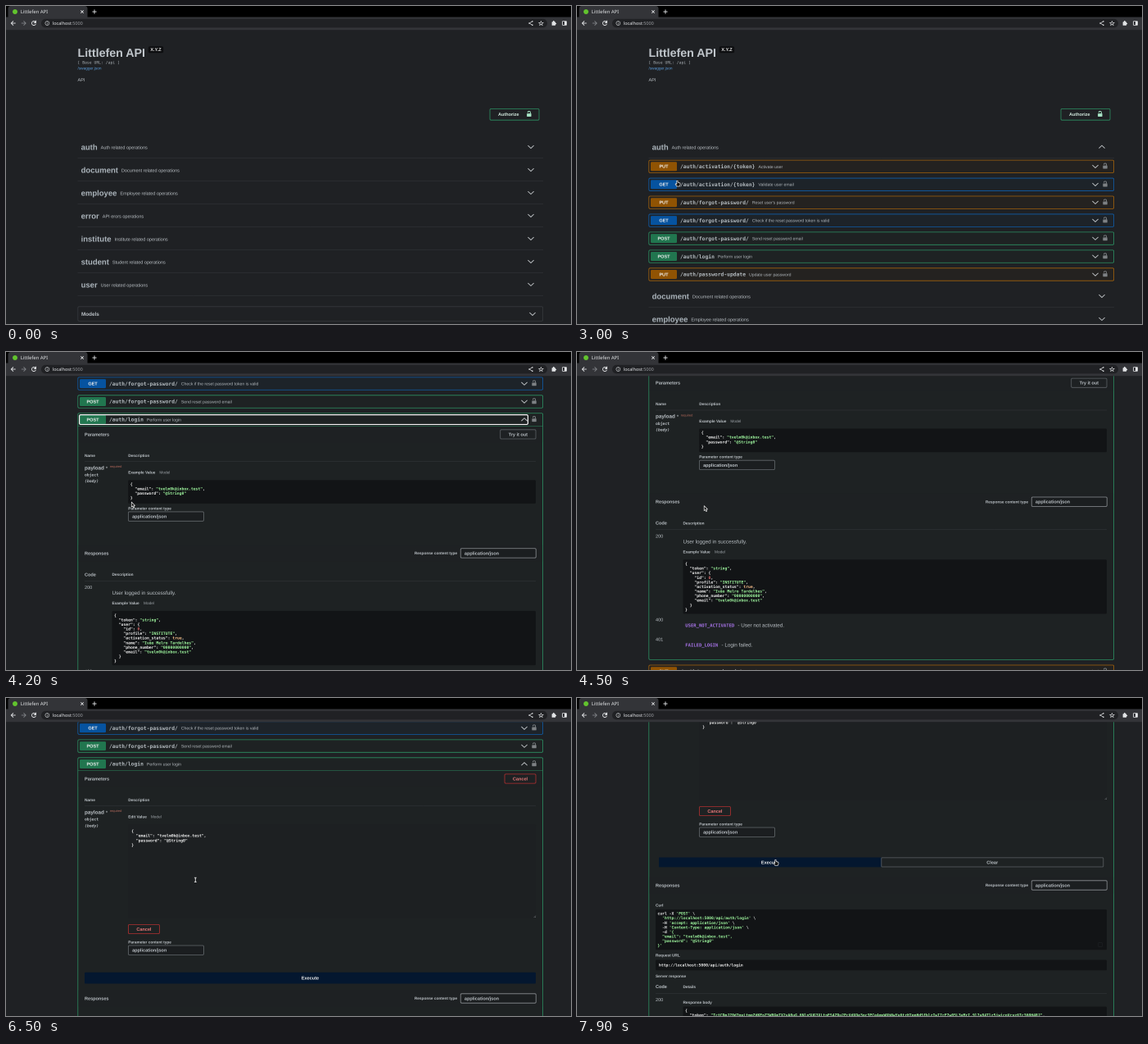
Animation of 690x388 px, one loop 8000 ms. Source, as an HTML page with a canvas:

```html
<!DOCTYPE html>
<html lang="en">
<head>
<meta charset="utf-8">
<title>API docs</title>
<style>
html, body { margin: 0; width: 100%; height: 100%; overflow: hidden; background: #1f2124; }
canvas { display: block; width: 690px; height: 388px; }
</style>
</head>
<body>
<canvas id="stage"></canvas>
<script>
const W = 690, H = 388, TOP = 29.2, LOOP = 8000, STEP = 100;
const canvas = document.getElementById('stage');
// Twice the screen density keeps the tiny type smooth.
const density = 2 * (window.devicePixelRatio || 1);
canvas.width = W * density;
canvas.height = H * density;
const ctx = canvas.getContext('2d');
ctx.textRendering = 'geometricPrecision';

const SANS = '"Liberation Sans", Arial, sans-serif';
const MONO = '"DejaVu Sans Mono", monospace';
const UI = '"Noto Sans", sans-serif';
const S12 = 4.74, S13 = 5.14, S14 = 5.53, S16 = 6.33;
const CH = S12 * 0.602, LEAD = 5.58;

const BG = '#1f2124', TEXT = '#bcc2c7', HEAD = '#abb4bb', LINE = '#36393d';
const WHITE = '#f1f1f1', GREEN = '#a2fca2', CODE_BG = '#121416';
const METHODS = {
  PUT: { fill: '#905303', edge: '#a1610d', tint: '#242220' },
  GET: { fill: '#0653a0', edge: '#0f5ca8', tint: '#1d2329' },
  POST: { fill: '#21764f', edge: '#2c8f62', tint: '#1e2223' }
};

const NAME = 'Littlefen API';
const MAIL = 'tvelm0k@inbox.test';
const TAGS = [
  ['auth', 'Auth related operations'],
  ['document', 'Document related operations'],
  ['employee', 'Employee related operations'],
  ['error', 'API erors operations'],
  ['institute', 'Institute related operations'],
  ['student', 'Student related operations'],
  ['user', 'User related operations']
];
const OPS = [
  ['PUT', '/auth/activation/{token}', 'Activate user'],
  ['GET', '/auth/activation/{token}', 'Validate user email'],
  ['PUT', '/auth/forgot-password/', "Reset user's password"],
  ['GET', '/auth/forgot-password/', 'Check if the reset password token is valid'],
  ['POST', '/auth/forgot-password/', 'Send reset password email'],
  ['POST', '/auth/login', 'Perform user login'],
  ['PUT', '/auth/password-update', 'Update user password']
];
const PAYLOAD = ['{', `  "email": "${MAIL}",`, '  "password": "@String0"', '}'];
const REPLY = [
  '{', '  "token": "string",', '  "user": {', '    "id": 0,', '    "profile": "INSTITUTE",',
  '    "activation_status": true,', '    "name": "Ivão Melro Tardelhes",',
  '    "phone_number": "00000000000",', `    "email": "${MAIL}"`, '  }', '}'
];
const CURL = [
  "curl -X 'POST' \\", "  'http://localhost:5000/api/auth/login' \\",
  "  -H 'accept: application/json' \\", "  -H 'Content-Type: application/json' \\",
  "  -d '{", `  "email": "${MAIL}",`, '  "password": "@String0"', "}'"
];

function makeToken(n) {
  const set = 'ABCDEFGHIJKLMNOPQRSTUVWXYZabcdefghijklmnopqrstuvwxyz0123456789';
  let seed = 41, out = '';
  while (out.length < n) {
    seed = (seed * 16807) % 2147483647;
    out += out.length === 36 || out.length === 110 ? '.' : set[seed % 62];
  }
  return out;
}
const BODY = ['{', `  "token": "${makeToken(140)}",`];

// Text is centred vertically on y; set large and scaled down for exact advances.
function text(s, x, y, size, color, o = {}) {
  ctx.save();
  ctx.translate(x, y + size * 0.35);
  ctx.scale(0.1, 0.1);
  ctx.font = `${o.italic ? 'italic ' : ''}${o.bold ? 'bold ' : ''}${size * 10}px ${o.font || SANS}`;
  ctx.textAlign = o.align || 'left';
  ctx.fillStyle = color;
  ctx.fillText(s, 0, 0);
  const w = ctx.measureText(s).width / 10;
  ctx.restore();
  return w;
}
const bold = (s, x, y, size = S14, color = TEXT, align) => text(s, x, y, size, color, { bold: true, align });
const mono = (s, x, y, size, color, o) => text(s, x, y, size, color, { bold: true, font: MONO, ...o });

function box(x, y, x2, y2, r, fill, edge, lw = 0.8) {
  ctx.beginPath();
  ctx.roundRect(x, y, x2 - x, y2 - y, r);
  if (fill) { ctx.fillStyle = fill; ctx.fill(); }
  if (edge) { ctx.strokeStyle = edge; ctx.lineWidth = lw; ctx.stroke(); }
}
function path(pts, color, lw, fill) {
  ctx.beginPath();
  for (let i = 0; i < pts.length; i += 2) ctx.lineTo(pts[i], pts[i + 1]);
  if (fill) { ctx.closePath(); ctx.fillStyle = fill; ctx.fill(); }
  ctx.strokeStyle = color;
  ctx.lineWidth = lw;
  ctx.stroke();
}
function arc(x, y, r, a, b, color, lw) {
  ctx.beginPath();
  ctx.arc(x, y, r, a, b);
  ctx.strokeStyle = color;
  ctx.lineWidth = lw;
  ctx.stroke();
}
const rule = (x, x2, y, color = LINE) => path([x, y, x2, y], color, 0.5);

function chevron(x, y, up) {
  const d = up ? -1.7 : 1.7;
  path([x - 3.6, y - d, x, y + d, x + 3.6, y - d], '#c4c8cb', 0.9);
}
function lock(x, y, color) {
  box(x - 2.7, y - 0.5, x + 2.7, y + 3.4, 0.5, color);
  arc(x, y - 1.5, 1.6, Math.PI, Math.PI * 2, color, 0.9);
  path([x + 1.6, y - 1.6, x + 1.6, y], color, 0.9);
}
function button(s, x, y, x2, y2, edge, color) {
  box(x, y, x2, y2, 1.3, null, edge);
  bold(s, (x + x2) / 2, (y + y2) / 2, S14, color, 'center');
}
function select(x, y, edge) {
  box(x, y - 5.7, x + 92, y + 5.7, 1.3, '#1b1e20', edge);
  bold('application/json', x + 4.7, y, S14);
}

const JSON_RE = /"[^"]*"(?=:)|"[^"]*"|\b(?:true|\d+)\b/g;
const CURL_RE = /'[^']*'?|^ +".*|^}'/g;
function tint(tok, line, at) {
  if (tok[0] === '"' && line[at + tok.length] === ':') return WHITE;
  if (tok === 'true') return '#fcc28c';
  return /^\d/.test(tok) ? '#d36363' : GREEN;
}
function code(lines, x, y, re) {
  lines.forEach((line, i) => {
    const put = (s, at, color) => s.trim() && mono(s, x + at * CH, y + i * LEAD, S12, color);
    let pos = 0;
    if (re) for (const m of line.matchAll(re)) {
      put(line.slice(pos, m.index), pos, WHITE);
      put(m[0], m.index, re === CURL_RE ? GREEN : tint(m[0], line, m.index));
      pos = m.index + m[0].length;
    }
    put(line.slice(pos), pos, WHITE);
  });
}

function tabsAndToolbar() {
  ctx.fillStyle = '#000';
  ctx.fillRect(0, 0, W, 14);
  box(2.5, 0, 99.5, 18, 3, '#333438');
  ctx.fillStyle = '#333438';
  ctx.fillRect(0, 13.5, W, TOP - 13.5);
  ctx.beginPath();
  ctx.arc(11, 7, 3, 0, 7);
  ctx.fillStyle = '#62c32e';
  ctx.fill();
  text(NAME, 17.8, 6.8, 5.85, '#e4e6e8', { font: UI });
  const c = '#e2e4e6';
  path([91.3, 5.3, 94.7, 8.7], c, 0.8);
  path([94.7, 5.3, 91.3, 8.7], c, 0.8);
  path([105.4, 7, 110.6, 7], c, 0.9);
  path([108, 4.4, 108, 9.6], c, 0.9);
  const arrow = (x, d, color) => {
    path([x - 2.7 * d, 21, x + 2.7 * d, 21], color, 0.9);
    path([x, 18.3, x - 2.7 * d, 21, x, 23.7], color, 0.9);
  };
  arrow(9, 1, c);
  arrow(21.5, -1, '#7f8286');
  arc(34, 21, 2.5, 0.3, 5.4, c, 0.9);
  path([36.6, 18.2, 36.6, 20.5, 34.3, 20.5], c, 0.8, c);
  box(43, 15.8, 661, 26.4, 5.3, '#202124');
  arc(50.3, 21, 2.4, 0, 7, '#c4c7ca', 0.7);
  path([50.3, 20.6, 50.3, 22.4], '#c4c7ca', 0.7);
  path([50.3, 19.4, 50.3, 20], '#c4c7ca', 0.7);
  const w = text('localhost', 56.8, 21, 5.45, '#e8eaed', { font: UI });
  text(':5000', 56.8 + w, 21, 5.45, '#9a9da1', { font: UI });
  path([642.8, 18.8, 639, 21, 642.8, 23.2], c, 0.7);
  for (const [x, y] of [[642.8, 18.8], [639, 21], [642.8, 23.2]]) box(x - 0.8, y - 0.8, x + 0.8, y + 0.8, 0.8, c);
  const star = [];
  for (let i = 0; i <= 10; i++) {
    const a = i * Math.PI / 5 - Math.PI / 2, r = i % 2 ? 1.2 : 2.9;
    star.push(653.4 + r * Math.cos(a), 21.2 + r * Math.sin(a));
  }
  path(star, c, 0.6);
  box(666.6, 19.3, 671, 23.8, 0.6, c);
  box(667.9, 17.9, 669.7, 20, 0.9, c);
  box(670, 20.6, 672.2, 22.4, 0.9, c);
  box(679.5, 18.6, 684.5, 23.4, 0.5, null, c, 0.8);
  box(682, 18.6, 684.5, 23.4, 0.3, c);
}

function info() {
  bold(NAME, 87.5, 57.2, 14.23, '#c0c6cb');
  box(173.8, 49.2, 192.2, 57.2, 2, '#0d0e10');
  bold('X.Y.Z', 183, 53.2, S14, '#e6e6e6', 'center');
  mono('[ Base URL: /api ]', 87.5, 68.8, S12, '#a9b0b5', { bold: false });
  text('/swagger.json', 87.5, 75.6, S12, '#5b9bd8');
  text('API', 87.5, 90, S14, TEXT);
  button('', 591, 125.5, 651, 139.2, '#2c8f62');
  bold('Authorize', 601, 132.3, S14, '#d3eadf');
  lock(638.8, 131.6, '#a6e3c5');
}
function tagRow(y, [name, desc], open) {
  const w = bold(name, 91.6, y, 9.49, HEAD);
  text(desc, 91.6 + w + 4, y + 0.3, S14, TEXT);
  chevron(641, y - 0.3, open);
  rule(87.5, 656, y + 13.4);
}
function opRow(y, [method, route, desc], open) {
  const m = METHODS[method];
  if (!open) box(87.8, y - 7.7, 655.6, y + 7.7, 1.6, m.tint, m.edge);
  box(90, y - 5.5, 122, y + 5.5, 1.2, m.fill);
  bold(method, 106, y, S14, '#f2f2f2', 'center');
  const w = mono(route, 126, y, S16, '#b3babf');
  text(desc, 126 + w + 4, y + 0.2, S13, '#b3b9be');
  chevron(633, y, open);
  lock(645, y - 0.7, '#7d8184');
}

function replies(d) {
  ctx.save();
  ctx.translate(0, d);
  bold('Code', 96, 269.5);
  bold('Description', 129.5, 269.5, S12);
  rule(96, 647, 277.5);
  text('200', 96, 285.3, S14, TEXT);
  text('User logged in successfully.', 129.5, 292, S16, TEXT);
  bold('Example Value', 129.5, 304.6, S12);
  text('Model', 168, 304.6, S12, '#9da3a8');
  box(129.5, 314, 647, 380.3, 1.6, CODE_BG);
  code(REPLY, 132, 319.2, JSON_RE);
  [['400', 387.5, 'USER_NOT_ACTIVATED', '- User not activated.'],
   ['401', 411.6, 'FAILED_LOGIN', '- Login failed.']].forEach(([n, y, key, msg]) => {
    text(n, 96, y, S14, TEXT);
    const w = mono(key, 132.3, y + 7, S14, '#a673e6');
    text(msg, 132.3 + w + 4.2, y + 6.7, S16, TEXT);
  });
  ctx.restore();
}
function liveReply(r) {
  ctx.save();
  ctx.translate(0, r - 228.5);
  bold('Curl', 96, 253, S12);
  box(96, 258, 647, 307.3, 1.6, CODE_BG);
  code(CURL, 98.4, 263, CURL_RE);
  box(636.8, 298.6, 641.4, 303.4, 0.5, null, '#202326', 0.6);
  bold('Request URL', 96, 314, S12);
  box(96, 319.5, 647, 332.3, 1.6, CODE_BG);
  mono('http://localhost:5000/api/auth/login', 100, 326, S12, WHITE);
  bold('Server response', 96, 339.5, S12);
  bold('Code', 96, 352.2);
  bold('Details', 129.5, 352.2, S12);
  rule(96, 647, 360.3);
  text('200', 96, 368, S14, TEXT);
  bold('Response body', 129.5, 371.5, S12);
  box(129.5, 376.5, 647, 450, 1.6, CODE_BG);
  code(BODY, 132, 381.2, JSON_RE);
  ctx.restore();
}
const replyShift = s => !s.edit ? 0 : s.exec ? 129 : 123;
const loginExtra = s => 348 + replyShift(s) + (s.done ? 220 : 0);

// Expanded login operation; its summary row is centred on y = 80.5.
function loginBlock(s) {
  const m = METHODS.POST, r = 243.5 + replyShift(s), band = 'rgba(31,33,35,.6)';
  box(87.8, 72.8, 655.6, 88.2 + loginExtra(s), 1.6, m.tint, m.edge);
  opRow(80.5, OPS[5], true);
  rule(88, 655.4, 88.4, m.edge);
  if (!s.edit) box(89.6, 74.7, 637.4, 86.5, 1.6, null, '#f4f4f4', 1.2);
  ctx.fillStyle = band;
  ctx.fillRect(88.3, 88.8, 566.8, 19.6);
  ctx.fillRect(88.3, r - 10, 566.8, 20);
  bold('Parameters', 96, 98.5);
  if (s.edit) button('Cancel', 609, 92.9, 647, 104.1, '#b03030', '#ea7a7a');
  else button('Try it out', 603.7, 92.9, 647, 104.1, '#5c6165', TEXT);
  bold('Name', 96, 124.2, S12);
  bold('Description', 149.2, 124.2, S12);
  rule(96, 647, 131.8);
  bold('payload', 96, 139.3, S16);
  text('*', 121.8, 139.8, S16, TEXT);
  text('required', 126.8, 137.8, 3.95, '#b56a5c');
  mono('object', 96, 148, S12, TEXT);
  mono('(body)', 96, 155.6, S12, TEXT, { italic: true });
  const w = bold(s.edit ? 'Edit Value' : 'Example Value', 149.2, 145, S12);
  text('Model', 149.2 + w + 5, 145, S12, '#9da3a8');
  if (s.edit) {
    box(149.2, 154.3, 647, 269, 1.4, '#1d2022');
    code(PAYLOAD, 153.2, 162.5);
    path([644.6, 268, 647, 265.6], '#8b8f92', 0.5);
    path([646, 268, 647, 267], '#8b8f92', 0.5);
    button('Cancel', 149.4, 276.5, 187.4, 287.5, '#b03030', '#ea7a7a');
  } else {
    box(149.2, 154.3, 647, 183, 1.6, CODE_BG);
    code(PAYLOAD, 151.7, 159.3, JSON_RE);
  }
  const p = s.edit ? 109 : 0;
  bold('Parameter content type', 149.2, 188.8 + p, S12);
  select(149.4, 198.7 + p, '#63686c');
  if (s.exec) {
    box(100, 338.5, 371.5, 350.4, 0, '#04172f');
    box(371.8, 338.9, 642.8, 350, 0.8, null, '#5c6165');
    bold('Execute', 235.5, 344.4, S14, WHITE, 'center');
    bold('Clear', 507.2, 344.4, S14, TEXT, 'center');
  } else if (s.edit) {
    box(96, 334.8, 647, 348.5, 1.3, '#04172f');
    bold('Execute', 371.5, 341.6, S14, WHITE, 'center');
  }
  bold('Responses', 96, r);
  bold('Response content type', 551, r, S12, TEXT, 'right');
  select(555.2, r, '#8b8f93');
  if (s.done) liveReply(r);
  else replies(r - 243.5);
}

function page(s, scroll) {
  ctx.save();
  ctx.beginPath();
  ctx.rect(0, TOP, W, H);
  ctx.clip();
  ctx.translate(0, -scroll);
  info();
  let y = 172.2;
  TAGS.forEach((tag, i) => {
    const open = s.auth && i === 0;
    tagRow(y, tag, open);
    if (open) {
      OPS.forEach((op, k) => {
        const oy = 195.8 + k * 21.95;
        if (k === 5 && s.login) {
          ctx.save();
          ctx.translate(0, 225);
          loginBlock(s);
          ctx.restore();
        } else opRow(oy + (k > 5 && s.login ? loginExtra(s) : 0), op);
      });
      y += 154 + (s.login ? loginExtra(s) : 0);
    }
    y += 27.97;
  });
  box(87.8, y - 1.2, 655.6, y + 16.4, 1.6, null, LINE);
  bold('Models', 92, y + 7.8, S16);
  chevron(643, y + 7.8);
  ctx.restore();
}

const SCROLL = [[0, 0], [3000, 0], [3400, 129], [3900, 129], [4400, 285.8], [4800, 285.8],
  [5200, 225], [6600, 225], [7100, 369], [8000, 369]];
const POINTER = [[1400, 470, 263], [1600, 399, 252], [1700, 399, 252], [2600, 149, 178], [2800, 124, 174],
  [3000, 122.5, 213], [3400, 131.5, 223], [3600, 132, 222], [3800, 150, 176], [4000, 152, 180],
  [4500, 155.2, 187.6], [4900, 158, 190], [5500, 544.2, 162.8], [5800, 624, 98], [5900, 624, 98],
  [6500, 231.3, 221.8], [6700, 231.3, 221.8], [7200, 242.5, 197.3], [8000, 242.5, 197.3]];
const SHAPES = [[1400, 'hand'], [4000, 'arrow'], [5700, 'hand'], [6000, 'arrow'], [6200, 'beam'], [7100, 'hand']];

function at(keys, t) {
  let i = 0;
  while (i < keys.length - 2 && t >= keys[i + 1][0]) i++;
  const a = keys[i], b = keys[i + 1];
  const k = Math.min(1, Math.max(0, (t - a[0]) / (b[0] - a[0])));
  return a.slice(1).map((v, n) => v + (b[n + 1] - v) * k);
}
function pointer(t) {
  if (t < POINTER[0][0]) return;
  const [x, y] = at(POINTER, t);
  const shape = SHAPES.filter(k => t >= k[0]).pop()[1];
  ctx.save();
  ctx.translate(x, y);
  ctx.lineJoin = 'round';
  if (shape === 'arrow') {
    path([0, 0, 0, 6, 1.4, 4.9, 2.5, 7, 3.5, 6.5, 2.5, 4.5, 4.2, 4.3, 0, 0], '#eee', 0.7, '#111');
  } else if (shape === 'beam') {
    path([-1.4, -2.6, 1.4, -2.6], '#eee', 0.8);
    path([-1.4, 2.8, 1.4, 2.8], '#eee', 0.8);
    path([0, -2.6, 0, 2.8], '#eee', 0.9);
  } else {
    path([-0.7, 0.2, 0.6, 0.2, 0.7, 2.3, 3.4, 3, 3.6, 5, 2.8, 7, -0.6, 7, -2.4, 4.4, -1.8, 3.7, -0.7, 4.4, -0.7, 0.2],
      '#eee', 0.7, '#111');
  }
  ctx.restore();
}

function draw(now) {
  const t = Math.floor((now % LOOP) / STEP) * STEP;
  const s = { auth: t >= 2800, login: t >= 3900, edit: t >= 5900, exec: t >= 7500, done: t >= 7600 };
  ctx.setTransform(density, 0, 0, density, 0, 0);
  ctx.fillStyle = BG;
  ctx.fillRect(0, 0, W, H);
  page(s, at(SCROLL, t)[0]);
  tabsAndToolbar();
  pointer(t);
}
let start;
function frame(now) {
  start ??= now;
  draw(now - start);
  requestAnimationFrame(frame);
}
draw(0);
requestAnimationFrame(frame);
</script>
</body>
</html>
```
